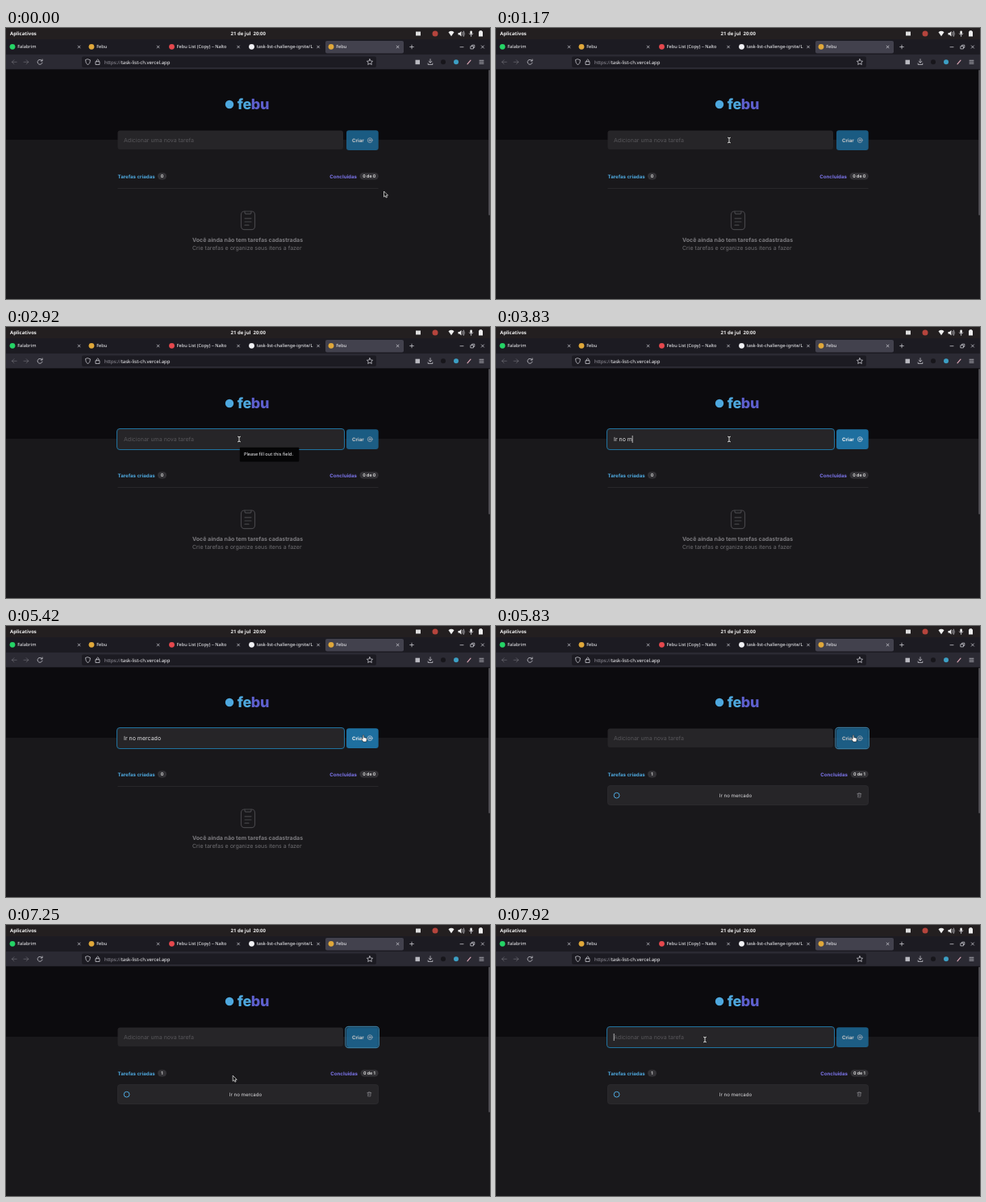
An HTML page for the animation above (8 s loop, 600x337 px).

```html
<!DOCTYPE html>
<html lang="pt">
<head>
<meta charset="utf-8">
<title>Lista de tarefas</title>
<style>
html, body { margin: 0; width: 100%; height: 100%; overflow: hidden; background: #19181b; }
svg { display: block; width: 600px; height: 337px; }
text { white-space: pre; text-rendering: geometricPrecision; }
.ui { font: 5.65px "Noto Sans", sans-serif; fill: #fbfbfe; }
.bar { font: bold 6px "Noto Sans", sans-serif; fill: #eee; }
.page { font: 7.03px Inter, sans-serif; }
.small { font-size: 6.15px; }
.bold { font-weight: 700; }
.pill { font: bold 5.27px Inter, sans-serif; fill: #d9d9d9; text-anchor: middle; }
.line { fill: none; stroke: #dcdce2; stroke-width: .7; stroke-linecap: round; stroke-linejoin: round; }
</style>
</head>
<body>
<svg viewBox="0 0 600 337">
  <!-- desktop bar -->
  <rect width="600" height="14" fill="#231f20"/>
  <g class="bar">
    <text x="5" y="9.3">Aplicativos</text>
    <text x="278.5" y="9.3">21 de jul  20:00</text>
  </g>
  <rect x="508" y="4.5" width="6" height="5" fill="#ddd"/>
  <circle cx="532" cy="7" r="3.5" fill="#b5443c"/>
  <path d="M548.5 5.3Q552 2.4 555.5 5.3L552 10.2Z" fill="#eee"/>
  <path d="M560.5 6h1.7l2.2-2v6.4l-2.2-2h-1.7z" fill="#eee"/>
  <path class="line" d="M566 5.2q1.3 2 0 4M567.4 4q2 3.2 0 6.4"/>
  <rect x="575.3" y="3.4" width="2.6" height="4.5" rx="1.3" fill="#eee"/>
  <path class="line" d="M574.2 7q2.4 3.6 4.8 0M576.6 9v1.6"/>
  <path d="M587 3.3h3v.9h1v6.4h-5V4.2h1z" fill="#eee"/>

  <!-- browser -->
  <rect y="14" width="600" height="20" fill="#1c1b22"/>
  <rect x="396" y="16" width="97" height="15.5" rx="2" fill="#42414d"/>
  <rect y="33" width="600" height="18.5" fill="#2b2a33"/>
  <rect x="94" y="35.5" width="365" height="13.5" rx="2" fill="#1c1b22"/>
  <clipPath id="tabClip"><rect x="300" y="15" width="83" height="18"/></clipPath>
  <g id="tabs" class="ui"></g>
  <path class="line" d="M500.7 23.5h4.6M503 21.2v4.6M563 23.7h4M576.2 22.7h3.2v3.2h-3.2zM577.6 22.5v-1.3h3.2v3.2h-1.2M589.3 21.9l3.2 3.2m0-3.2l-3.2 3.2"/>
  <path class="line" stroke-opacity=".35" d="M13.2 42.3H7.5m2.5-2.6-2.6 2.6 2.6 2.6M27.7 42.3H22m3.2-2.6 2.6 2.6-2.6 2.6"/>
  <path class="line" d="M44.6 40.6A3 3 0 1 0 45 43.2M45.1 39v2h-2"/>
  <path class="line" d="M101.5 38.8l3 1.1q0 4-3 6-3-2-3-6z"/>
  <path class="line" d="M111.4 41.7h4.6v3.8h-4.6zM112.4 41.5v-1.3q1.3-2.4 2.6 0v1.3"/>
  <text class="ui" x="122" y="44.6" style="font-size:6px"><tspan fill="#9c9ba4">https://</tspan>task-list-ch.vercel.app</text>
  <path class="line" d="M451 38.7l1.1 2.3 2.5.3-1.8 1.7.5 2.5-2.3-1.2-2.3 1.2.5-2.5-1.8-1.7 2.5-.3z"/>
  <rect x="507.5" y="39.7" width="5.5" height="5.5" fill="#b9b9c0"/>
  <path class="line" d="M526 38.7v4.5m-1.9-1.9 1.9 1.9 1.9-1.9M523.2 44v1.5h5.6V44"/>
  <circle cx="542" cy="42.3" r="3" fill="#17161b"/>
  <circle cx="558" cy="42.3" r="3" fill="#3c9fc4"/>
  <path d="M572 44.8l4-4.6" stroke="#d9a5b4" stroke-width="1.2" stroke-linecap="round"/>
  <path class="line" d="M587 40.3h5m-5 2h5m-5 2h5"/>

  <!-- page -->
  <rect y="51.5" width="600" height="88" fill="#0c0b0e"/>
  <rect y="139" width="600" height="198" fill="#19181b"/>
  <rect x="598.2" y="52" width="1.8" height="181" rx=".9" fill="#504f54"/>
  <circle cx="277" cy="95" r="5.2" fill="#4ea8de"/>
  <text x="286.8" y="101" style="font:800 18px Inter,sans-serif;letter-spacing:-.4px"><tspan fill="#4ea8de">fe</tspan><tspan fill="#5e60ce">bu</tspan></text>

  <rect x="138.5" y="127.5" width="279.5" height="23.5" rx="3" fill="#262528"/>
  <rect id="inputRing" x="137.5" y="126.5" width="282" height="26" rx="3.5" fill="#262528" stroke="#20729f"/>
  <text id="hint" class="page" x="146" y="141.9" fill="#58575b">Adicionar uma nova tarefa</text>
  <text id="typed" class="page" x="146" y="141.9" fill="#e4e4e6"></text>
  <rect id="caret" y="135" width=".7" height="9" fill="#f2f2f2"/>

  <rect id="buttonRing" x="420.8" y="126.4" width="41.6" height="26.2" rx="3.8" fill="none" stroke="#38799d" stroke-width="1.2"/>
  <g id="button">
    <rect x="422" y="127.3" width="39.7" height="24.6" rx="3.2" fill="#1e6f9f"/>
    <text class="page small bold" x="429" y="141.8" fill="#f2f2f2">Criar</text>
    <circle class="line" cx="451.2" cy="139.6" r="2.9"/>
    <path class="line" d="M449.9 139.6h2.6m-1.3-1.3v2.6"/>
  </g>

  <text class="page small bold" x="138.5" y="186.6" fill="#4ea8de">Tarefas criadas</text>
  <rect x="188" y="180" width="11" height="8.4" rx="4.2" fill="#333236"/>
  <text id="total" class="pill" x="193.5" y="186.1"></text>
  <text id="doneLabel" class="page small bold" y="186.6" fill="#7b74e8" text-anchor="end">Concluídas</text>
  <rect id="donePill" y="180" height="8.4" rx="4.2" fill="#333236"/>
  <text id="done" class="pill" x="450.3" y="186.1"></text>

  <g id="empty">
    <path d="M138.5 199.5h323" stroke="#2c2b2f" stroke-width=".8"/>
    <g fill="none" stroke="#454448" stroke-width="1.2" stroke-linecap="round" stroke-linejoin="round">
      <rect x="291.5" y="228" width="17" height="22.7" rx="4"/>
      <path d="M296 228v1.2q0 2 2 2h4q2 0 2-2V228M296 236.8h8M296 241h8M296 245.2h5"/>
    </g>
    <g class="page" fill="#7c7b7f">
      <text class="bold" x="231" y="266.3">Você ainda não tem tarefas cadastradas</text>
      <text x="231" y="275.6" fill="#706f73">Crie tarefas e organize seus itens a fazer</text>
    </g>
  </g>
  <g id="task">
    <rect x="138.5" y="198.5" width="323" height="24" rx="3" fill="#262528" stroke="#302f33" stroke-width=".7"/>
    <circle cx="149.6" cy="210.7" r="3.4" fill="none" stroke="#4ea8de" stroke-width="1"/>
    <text class="page small" x="297" y="212.8" fill="#dddcdf" text-anchor="middle">Ir no mercado</text>
    <path class="line" stroke-opacity=".4" d="M447.8 208.7h5m-3.5 0v-1h2v1m-3 0 .3 4.4h3.4l.3-4.4m-2.8 1.2v2m1.6-2v2"/>
  </g>

  <g id="tooltip">
    <rect x="289.8" y="149.8" width="73.5" height="17.7" rx="1" fill="#050506"/>
    <text class="ui" x="295" y="160.4">Please fill out this field.</text>
  </g>

  <g id="arrow"><path d="M0 0v7l1.6-1.4 1.1 2.4 1.2-.6-1-2.3h2.1z" fill="#111" stroke="#f4f4f4" stroke-width=".7"/></g>
  <g id="beam" fill="none" stroke-linecap="round">
    <path d="M-1.5-3.3Q0-3.3 0-2.5V2.5Q0 3.3-1.5 3.3M1.5-3.3Q0-3.3 0-2.5M0 2.5Q0 3.3 1.5 3.3" stroke="#111" stroke-width="1.8"/>
    <path d="M-1.5-3.3Q0-3.3 0-2.5V2.5Q0 3.3-1.5 3.3M1.5-3.3Q0-3.3 0-2.5M0 2.5Q0 3.3 1.5 3.3" stroke="#fff" stroke-width=".9"/>
  </g>
  <g id="hand"><path d="M-.8 0Q0-1 .8 0V2.6l2.7.6q1 .3.9 1.4L3.8 8H-.2L-2.4 4.8q-.1-1 .9-.8l.7.6z" fill="#fff" stroke="#111" stroke-width=".6"/></g>
</svg>
<script>
const $ = id => document.getElementById(id);
const show = (id, on) => { $(id).style.opacity = +on; };
const clamp = v => Math.min(1, Math.max(0, v));

const LOOP = 8000, CLICK = 5580, REFOCUS = 7670;
const TASK = "Ir no mercado";
const keyTimes = [3000, 3170, 3330, 3500, 3580, 3750, 3830, 3920, 4000, 4250, 4330, 4420, 4580];
// time, x, y
const path = [
  [0, 468.5, 203], [80, 468.5, 203], [480, 429, 146], [830, 451, 137],
  [1170, 289, 139.5], [5120, 289, 139.5], [5400, 443, 136], [5960, 443, 136],
  [6500, 298, 213], [6600, 298, 213], [6830, 292, 209], [6960, 292, 209], [7720, 259, 142.5]
];

const tabs = [
  [8, "#25d366", "Falabrim"], [106, "#e0a83a", "Febu"],
  [205.5, "#e5484d", "Febu List (Copy) – Nalto"],
  [304.5, "#f0f0f4", "task-list-challenge-ignite/L"], [403, "#e0a83a", "Febu"]
];
$("tabs").innerHTML = tabs.map(([x, color, name], i) => `
  <circle cx="${x}" cy="23.3" r="3.4" fill="${color}"/>
  <text x="${x + 6.2}" y="25.4" ${i === 3 ? 'clip-path="url(#tabClip)"' : ""}>${name}</text>
  <path class="line" d="M${x + 81.2} 22.1l2.8 2.8m0-2.8l-2.8 2.8"/>`).join("");

function pointer(t) {
  const i = path.findIndex(p => p[0] > t);
  if (i < 0) return path.at(-1).slice(1);
  const [t0, x0, y0] = path[i - 1], [t1, x1, y1] = path[i];
  const u = (t - t0) / (t1 - t0), e = u * u * (3 - 2 * u);
  return [x0 + (x1 - x0) * e, y0 + (y1 - y0) * e];
}

function draw(t) {
  const created = t >= CLICK;
  const count = created ? 0 : keyTimes.filter(k => k <= t).length;
  const focus = created ? clamp((t - REFOCUS) / 80) : clamp((t - 1500) / 250);

  $("typed").textContent = TASK.slice(0, count);
  show("hint", !count);
  show("inputRing", focus);
  show("caret", t >= 7750 || count && t < 4580);
  $("caret").setAttribute("x", 145.8 + (count ? $("typed").getComputedTextLength() : 0));
  show("tooltip", t >= 2080 && t < 3000);
  show("button", count ? 1 : .8);
  show("buttonRing", created && t < REFOCUS);

  show("empty", !created);
  show("task", created);
  $("total").textContent = +created;
  $("done").textContent = `0 de ${+created}`;
  $("doneLabel").setAttribute("x", created ? 436 : 435);
  $("donePill").setAttribute("x", created ? 439.6 : 438.5);
  $("donePill").setAttribute("width", created ? 22 : 23.3);

  const [x, y] = pointer(t);
  const inRow = y > 127 && y < 152;
  const shape = inRow && x > 138 && x < 419 ? "beam" : inRow && x > 421 && x < 462 ? "hand" : "arrow";
  for (const id of ["arrow", "beam", "hand"]) show(id, id === shape);
  $(shape).setAttribute("transform", `translate(${x} ${y})`);
}

function tick() {
  draw(performance.now() % LOOP);
  requestAnimationFrame(tick);
}
tick();
</script>
</body>
</html>
```
